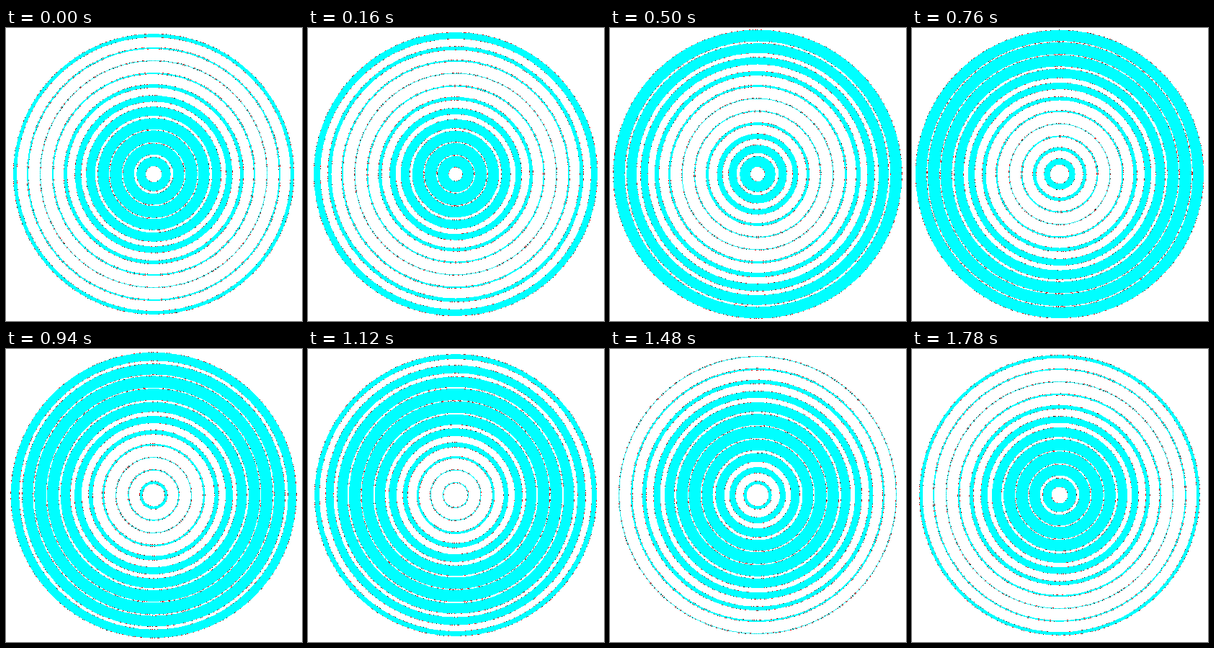
An HTML page without scripts for the animation above (1800 ms loop, 411 by 407 pixels).

```html
<!DOCTYPE html>
<html lang="en">
<head>
<meta charset="utf-8">
<title>Pulsing rings</title>
<style>
html, body { margin: 0; width: 100%; height: 100%; overflow: hidden; background: #fff; }
svg { display: block; width: 100vw; height: 100vh; }

/* Each ring swells and thins as a sine wave; the phase moves 1/12 turn per ring. */
circle {
  cx: 205px;
  cy: 203px;
  r: calc(var(--k) * 17.5px);
  fill: none;
  shape-rendering: crispEdges;
  animation: edge 1.8s cubic-bezier(.3642, 0, .6358, 1) infinite;
  animation-delay: calc((3 - var(--k)) * 150ms - 1800ms);
}
.dark { stroke: #000; stroke-dasharray: 1 5; }
.red { stroke: #f00; stroke-dasharray: 2 6; stroke-dashoffset: 1; }
.band { stroke: #0ff; animation-name: band; }

@keyframes edge {
  0%, 100% { stroke-width: 17.2px; }
  50% { stroke-width: 1.7px; }
}
@keyframes band {
  0%, 100% { stroke-width: 16.3px; }
  50% { stroke-width: .8px; }
}
</style>
</head>
<body>
<svg viewBox="0 0 411 407">
  <g style="--k:1"><circle class="dark"/><circle class="red"/><circle class="band"/></g>
  <g style="--k:2"><circle class="dark"/><circle class="red"/><circle class="band"/></g>
  <g style="--k:3"><circle class="dark"/><circle class="red"/><circle class="band"/></g>
  <g style="--k:4"><circle class="dark"/><circle class="red"/><circle class="band"/></g>
  <g style="--k:5"><circle class="dark"/><circle class="red"/><circle class="band"/></g>
  <g style="--k:6"><circle class="dark"/><circle class="red"/><circle class="band"/></g>
  <g style="--k:7"><circle class="dark"/><circle class="red"/><circle class="band"/></g>
  <g style="--k:8"><circle class="dark"/><circle class="red"/><circle class="band"/></g>
  <g style="--k:9"><circle class="dark"/><circle class="red"/><circle class="band"/></g>
  <g style="--k:10"><circle class="dark"/><circle class="red"/><circle class="band"/></g>
  <g style="--k:11"><circle class="dark"/><circle class="red"/><circle class="band"/></g>
</svg>
</body>
</html>
```
